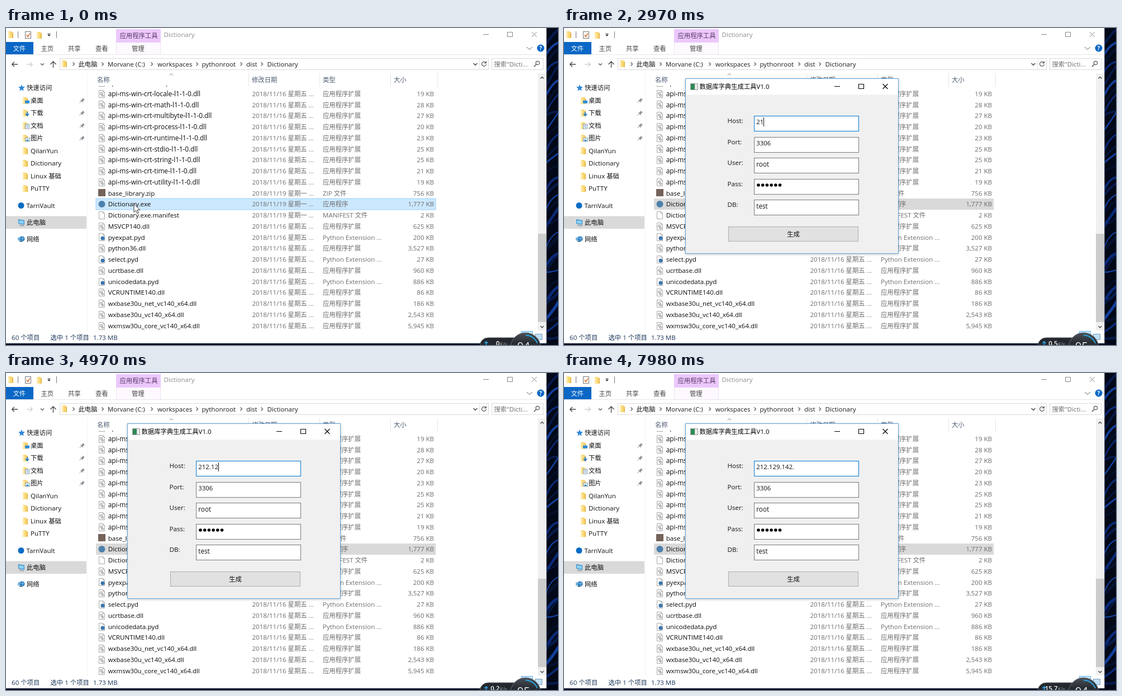
Write an HTML page that moves like this. It is 988 px wide and 567 px high and loops after 8 s.

```html
<!DOCTYPE html>
<html lang="zh-CN">
<head>
<meta charset="utf-8">
<title>Dictionary</title>
<style>
html, body { margin: 0; width: 100%; height: 100%; overflow: hidden; background: #020817; }
svg { display: block; width: 100vw; height: 100vh; }
text { font-family: 'Open Sans', 'Noto Sans CJK SC', 'Noto Sans CJK JP', 'Noto Sans CJK', sans-serif; white-space: pre; }
</style>
</head>
<body>
<svg id="stage" viewBox="0 0 988 567" preserveAspectRatio="none"></svg>
<script>
const out = [];
const add = s => out.push(s);
const rect = (x, y, w, h, fill, extra = '') =>
  add(`<rect x="${x}" y="${y}" width="${w}" height="${h}" fill="${fill}" ${extra}/>`);
const frame = (x, y, w, h, fill, stroke, extra = '') =>
  rect(x + .5, y + .5, w - 1, h - 1, fill, `stroke="${stroke}" ${extra}`);
const line = (d, stroke, w = 1, extra = '') =>
  add(`<path d="${d}" fill="none" stroke="${stroke}" stroke-width="${w}" ${extra}/>`);
const shape = (d, fill, extra = '') => add(`<path d="${d}" fill="${fill}" ${extra}/>`);
const dot = (x, y, r, fill, extra = '') => add(`<circle cx="${x}" cy="${y}" r="${r}" fill="${fill}" ${extra}/>`);
// y is the vertical centre of the line
const text = (x, y, s, fill = '#111', size = 11.6, extra = '') => {
  const runs = s.replace(/[\u4e00-\u9fff]+/g, m => `<tspan font-size="11.35">${m}</tspan>`);
  add(`<text x="${x}" y="${y + 4.2}" fill="${fill}" font-size="${size}" ${extra}>${runs}</text>`);
};
const group = (attrs, draw) => { add(`<g ${attrs}>`); draw(); add('</g>'); };
const chevron = (x, y, dx, dy, color = '#555', w = 1.2) =>
  line(dx ? `M${x - 1.5} ${y - 3}l3 3l-3 3` : `M${x - 3} ${y - 1.5 * dy}l3 ${3 * dy}l3 ${-3 * dy}`, color, w);

function folder(x, y) {
  shape(`M${x} ${y - 6}h7v12h-7z`, '#f8d775');
  shape(`M${x + 7} ${y - 4}h2v10h-2z`, '#e9b84c');
  shape(`M${x} ${y - 6}l3 2v10l-3 -1z`, '#ffe9a6');
}

function page(x, y) {
  line(`M${x + .5} ${y - 6.5}h7l3 3v10h-10zM${x + 7.5} ${y - 6.5}v3h3`, '#a9a9a9', 1, 'style="fill:#fff"');
}

const icons = {
  dll(x, y) {
    page(x, y);
    dot(x + 4.5, y - .8, 2, '#eee', 'stroke="#888"');
    dot(x + 7, y + 2.8, 1.7, '#eee', 'stroke="#888"');
  },
  pyd(x, y) { page(x, y); dot(x + 7, y + 2, 3.6, '#3b76ad'); },
  zip(x, y) { rect(x - 1, y - 7, 13, 13, '#75625a'); },
  exe(x, y) { dot(x + 5.5, y, 6, '#4d80ad'); },
  doc: page
};

function desktop() {
  rect(0, 0, 988, 567, '#020817');
  let seed = 7;
  const rnd = () => (seed = seed * 16807 % 2147483647) / 2147483647;
  for (let i = 0; i < 34; i++) {
    const y = i * 17 - 8, bend = rnd() * 30;
    line(`M966 ${y + bend}Q${972 + rnd() * 8} ${y + 4} 990 ${y - 14 + rnd() * 20}`,
      ['#0a2a78', '#061a4c', '#123f9c', '#04112f'][i % 4], 1.5 + rnd() * 4);
  }
  rect(0, 564, 968, 3, '#041126');
}

function titleBar() {
  rect(0, 0, 967, 564, '#fff');
  rect(967, 0, 1, 564, '#5a6478');
  folder(4, 12);
  rect(21, 6, 1, 12, '#777');
  frame(34, 6, 11, 13, '#fff', '#777');
  line('M36.5 12.5l2.5 3l4 -6', '#d06a28', 1.5);
  folder(55, 13);
  shape('M74.5 12h5l-2.5 3z', '#222');
  rect(74.5, 10, 5, 1, '#222');
  rect(90, 6, 1, 12, '#777');
  rect(197, 2, 80, 24, '#ebc8fb');
  rect(197, 26, 80, 21, '#fdf9fe');
  line('M197.5 26v21M276.5 26v21', '#eee3f2');
  text(203.5, 14, '应用程序工具', '#5a3a68');
  text(282.5, 11.5, 'Dictionary', '#8d8d8d');
  line('M854 11.5h10M897.5 7.5h9v8h-9zM941 7l9 9M950 7l-9 9', '#858585');
  rect(0, 25, 49, 22, '#0a67c6');
  text(12.5, 37, '文件', '#fff');
  [[62.5, '主页'], [111, '共享'], [160, '查看'], [225, '管理']].forEach(([x, s]) => text(x, 37, s, '#444'));
  line('M932 34l5 4.5l5 -4.5', '#666');
  dot(957, 36, 6.5, '#0a67c6');
  text(957, 36, '?', '#fff', 10, 'text-anchor="middle" font-weight="700"');
  rect(0, 47, 967, 1, '#e6e6e6');
}

function addressBar() {
  line('M21 65h-10M15 60.8l-4.3 4.2l4.3 4.2', '#444', 1.3);
  line('M37 65h10M43 60.8l4.3 4.2l-4.3 4.2', '#d0d0d0', 1.3);
  chevron(65, 65, 0, 1);
  line('M84.5 71v-11M79.5 65l5 -5l5 5', '#444', 1.3);
  frame(96, 54, 768, 21, '#fff', '#d9d9d9');
  rect(847, 55, 1, 19, '#e4e4e4');
  folder(100, 64);
  [121, 173, 261, 342, 421, 458].forEach(x => chevron(x, 64.5, 1, 0));
  [[129.5, '此电脑'], [182, 'Morvane (C:)', 11.3], [271, 'workspaces', 11.4], [350.5, 'pythonroot'],
   [430, 'dist'], [467.5, 'Dictionary']].forEach(([x, s, z]) => text(x, 64.5, s, '#1c1c1c', z));
  line('M836.5 63l3.5 3.5l3.5 -3.5', '#444', 1.4);
  line('M858.7 61.8A4 4 0 1 0 859.5 65M859.4 59.5v3.2h-3.2', '#555', 1.2);
  frame(869, 54, 93, 21, '#fff', '#d9d9d9');
  text(873.5, 64.5, '搜索"Dicti...', '#707070', 11.5);
  dot(951.5, 62.5, 3.2, 'none', 'stroke="#555" stroke-width="1.2"');
  line('M949 65l-4 4.3', '#555', 1.5);
}

function pin(x, y) {
  shape(`M${x + 1} ${y - 5}l4 4l-1.2 .4l-2 2l-.3 2.4l-4.6 -4.6l2.4 -.3l2 -2z`, '#8d9299');
  line(`M${x - 1} ${y + 1}l-3.5 3.5`, '#8d9299');
}

function sidebar() {
  rect(0, 336.5, 144, 22.5, '#d9d9d9');
  shape('M28 101l1.6 4l4.4 .3l-3.3 2.9l1 4.3l-3.7 -2.3l-3.7 2.3l1 -4.3l-3.3 -2.9l4.4 -.3z', '#2f86d6');
  text(37, 107, '快速访问');
  const items = ['桌面', '下载', '文档', '图片', 'QilanYun', 'Dictionary', 'Linux 基础', 'PuTTY'];
  items.forEach((s, i) => {
    const y = 129.7 + i * 22.5;
    folder(30, y);
    if (i < 4) pin(136, y);
    if (i === 0) rect(34, y, 8, 5, '#2a8ad8');
    if (i === 1) line(`M38 ${y - 2}v6M35 ${y + 1.5}l3 3l3 -3`, '#1f78cc', 1.8);
    if (i === 2) { frame(34, y - 3, 8, 9, '#fff', '#7f98ad'); line(`M36 ${y}h4M36 ${y + 2.5}h4`, '#4c8ac0'); }
    if (i === 3) { frame(34, y - 1, 9, 7, '#d9effb', '#8ca6b5'); shape(`M35 ${y + 5}l3 -3l4 3z`, '#418ab8'); }
    text(44, y, s);
  });
  dot(27, 317.5, 5.5, '#0a6cc4');
  text(36.5, 317.3, 'TarnVault');
  shape('M22 342l11 2v8l-11 -2z', '#3b91cf');
  shape('M23.2 343.7l8.6 1.6v5.2l-8.6 -1.6z', '#8ed2f5');
  shape('M25 352l8 1.5l-2 1l-8 -1.5z', '#7d8b97');
  text(37, 348, '此电脑');
  shape('M21 375l6 -2v8l-6 -1z', '#7db9df');
  dot(29, 377, 4.6, '#2e7fc0');
  line('M25 376q4 2 8 -1M29 372.5q3 4 0 9', '#9ad1f0', .8);
  rect(24, 381, 6, 1.5, '#4f6d85');
  text(37, 378, '网络');
  rect(145, 81, 1, 460, '#f3f3f3');
}

const api = 'api-ms-win-crt-';
const files = [
  ...Object.entries({ heap: 19, locale: 19, math: 28, multibyte: 27, process: 20, runtime: 23, stdio: 25,
    string: 25, time: 21, utility: 19 }).map(([n, kb]) => [api + n + '-l1-1-0.dll', kb]),
  ['base_library.zip', '756'], ['Dictionary.exe', '1,777'], ['Dictionary.exe.manifest', '2'],
  ['MSVCP140.dll', '625'], ['pyexpat.pyd', '200'], ['python36.dll', '3,527'], ['select.pyd', '27'],
  ['ucrtbase.dll', '960'], ['unicodedata.pyd', '886'], ['VCRUNTIME140.dll', '86'],
  ['wxbase30u_net_vc140_x64.dll', '186'], ['wxbase30u_vc140_x64.dll', '2,543'],
  ['wxmsw30u_core_vc140_x64.dll', '5,945']
];
const kinds = { dll: '应用程序扩展', pyd: 'Python Extension ...', zip: 'ZIP 文件', exe: '应用程序', manifest: 'MANIFEST 文件' };

function fileList() {
  add('<clipPath id="rows"><rect x="146" y="103" width="805" height="438"/></clipPath>');
  rect(161, 305, 608, 20, '#cce8ff', 'id="row"');
  group('clip-path="url(#rows)"', () => files.forEach(([name, kb], i) => {
    const y = 117.6 + (i - 1) * 19.76, ext = name.split('.').pop();
    const monday = ['zip', 'exe', 'manifest'].includes(ext);
    (icons[ext] || icons.doc)(166, Math.round(y));
    text(182.7, y, name, '#0c0c0c', name.startsWith(api) ? 11.8 : name.startsWith('wx') ? 11.43 : 11.65);
    text(440.5, y, `2018/11/${monday ? '19 星期一' : '16 星期五'} ...`, '#6d6d6d', 11.5);
    text(567, y, kinds[ext], '#6d6d6d', 11.5);
    text(766, y, kb + ' KB', '#6d6d6d', 11.5, 'text-anchor="end"');
  }));
  [[163, '名称'], [440, '修改日期'], [567, '类型'], [694, '大小']].forEach(([x, s]) => text(x, 93, s, '#4c5a70'));
  [434, 561, 688, 772].forEach(x => rect(x, 81, 1, 24, '#e5e5e5'));
  line('M293 84.5l3 -3l3 3', '#777');
  rect(952, 81, 15, 460, '#f0f0f0');
  rect(952, 368, 15, 158, '#cdcdcd');
  chevron(959.5, 89, 0, -1, '#505050', 1.5);
  chevron(959.5, 534.5, 0, 1, '#505050', 1.5);
}

function statusBar() {
  const c = '#1e395b';
  text(10, 553.5, '60 个项目', c);
  text(79.5, 553.5, '选中 1 个项目', c);
  text(156, 553.5, '1.73 MB', c, 11.5);
  frame(922, 542, 21, 20, '#cce8ff', '#5fb2ee');
  line('M926 547.5h13M926 551.5h13M926 555.5h13', '#5b7da0');
  frame(947, 547, 13, 11, '#bfe0f6', '#7c9ab5');
}

function gauge() {
  rect(848, 554, 90, 30, '#24282e', 'rx="15" stroke="#555b63"');
  line('M859.5 569v-8M856.5 564l3 -3.2l3 3.2', '#2ea4e8', 1.6);
  text(883.5, 564.2, '', '#fff', 11.5, 'id="speed" text-anchor="end" font-weight="600"');
  text(884, 564.8, 'K/s', '#9aa0a8', 9);
  dot(930, 572, 27, 'url(#ball)', 'stroke="#666d76"');
  line('M930 549.5A22.5 22.5 0 0 1 951 564', '#27a5dc', 2);
  text(926.5, 571.5, '', '#f2f5f8', 20, 'id="load" text-anchor="middle"');
}

function dialog() {
  rect(217, 91, 382, 314, '#000', 'opacity=".22" filter="url(#blur)"');
  frame(217, 90, 382, 314, '#f0f0f0', '#5ba3dc');
  rect(218, 91, 380, 28.5, '#fff');
  frame(226, 99, 14, 12, '#e8e8e8', '#9a9a9a');
  rect(227, 100, 7, 10, '#2f8a55');
  text(242.5, 105, '数据库字典生成工具V1.0', '#000', 11.5);
  line('M484 104.5h10M527.5 100.5h9v8h-9zM570.5 100l9 9M579.5 100l-9 9', '#000', 1.1);
  ['Host:', 'Port:', 'User:', 'Pass:', 'DB:'].forEach((label, i) => {
    const y = 157 + i * 37.6;
    text(292.5, y + 8.8, label, '#111', 11.6);
    frame(340, Math.round(y), 188, 28, '#fff', i ? '#7a7a7a' : '#0078d7', `id="field${i}"`);
  });
  rect(344, 160, 50.5, 17, '#3399ff', 'id="mark"');
  text(344.3, 168.2, '', '#111', 11.4, 'id="host"');
  rect(394.5, 160, 1, 16, '#111', 'id="caret"');
  text(344.3, 205.8, '3306', '#111', 11.4);
  text(344.3, 243.6, 'root', '#111', 11.7);
  for (let i = 0; i < 6; i++) dot(348 + i * 7.7, 281, 2.8, '#000');
  text(344.3, 319, 'test', '#111', 11.7);
  frame(294, 355, 233, 27, '#e1e1e1', '#adadad');
  text(410.5, 368.8, '生成', '#111', 11.4, 'text-anchor="middle"');
}

function pointers() {
  group('id="arrow"', () => shape('M.5 .5v15l3.5 -3.2l2.3 5.4l2.4 -1l-2.3 -5.3h4.8z', '#fff', 'stroke="#222" stroke-width=".9"'));
  group('id="beam"', () => line('M389.5 202.5h2.5l1.2 1l1.2 -1h2.5M393.2 203.5v12M389.5 216.5h2.5l1.2 -1l1.2 1h2.5', '#000', 1.4));
}

add(`<defs><filter id="blur" x="-5%" y="-5%" width="110%" height="110%"><feGaussianBlur stdDeviation="2.5"/></filter>
<linearGradient id="ball" x1="0" y1="0" x2="0" y2="1"><stop stop-color="#4a5058"/><stop offset=".35" stop-color="#262b31"/></linearGradient></defs>`);
desktop();
titleBar();
addressBar();
sidebar();
fileList();
statusBar();
gauge();
group('id="dialog"', dialog);
pointers();
document.getElementById('stage').innerHTML = out.join('');

const $ = id => document.getElementById(id);
const show = (id, on) => $(id).setAttribute('display', on ? 'inline' : 'none');
const set = (id, attrs) => { for (const k in attrs) $(id).setAttribute(k, attrs[k]); };

const steps = [
  { at: 0, speed: '0', load: 94, arrow: [228.5, 314] },
  { at: 1000, host: 'localhost', speed: '0.5', load: 95, caret: true },
  { at: 2000, host: 'localhost', speed: '0.5', load: 95, arrow: [302.5, 177] },
  { at: 2970, host: '21', speed: '0.5', load: 95, caret: true },
  { at: 3990, host: '212', speed: '0', load: 95, caret: true },
  { at: 4970, host: '212.12', speed: '0.2', load: 95, caret: true },
  { at: 5990, host: '212.129.', speed: '0', load: 95 },
  { at: 7010, host: '212.129.142', speed: '0.3', load: 94, caret: true },
  { at: 7980, host: '212.129.142.', speed: '15.7', load: 94 }
];

let current;
function update(t) {
  const s = steps.filter(p => p.at <= t).pop();
  if (s === current) return;
  current = s;
  const open = !!s.host, picked = s.host === 'localhost', hover = s.at === 1000;
  set('row', open ? { fill: '#d9d9d9', stroke: 'none' } : { fill: '#cce8ff', stroke: '#99d1ff' });
  $('speed').textContent = s.speed;
  $('load').textContent = s.load;
  show('dialog', open);
  show('mark', picked);
  show('beam', hover);
  show('arrow', s.arrow);
  if (s.arrow) set('arrow', { transform: `translate(${s.arrow})` });
  set('field2', { stroke: hover ? '#171717' : '#7a7a7a' });
  $('host').textContent = s.host || '';
  set('host', picked ? { fill: '#fff', 'font-size': 11.7 } : { fill: '#111', 'font-size': 11.4 });
  show('caret', s.caret);
  if (s.caret) {
    set('caret', {
      x: picked ? 394.5 : Math.round(344.3 + $('host').getComputedTextLength()),
      fill: picked ? '#ff8728' : '#111'
    });
  }
}

function tick() {
  update(performance.now() % 8000);
  requestAnimationFrame(tick);
}
tick();
</script>
</body>
</html>
```
